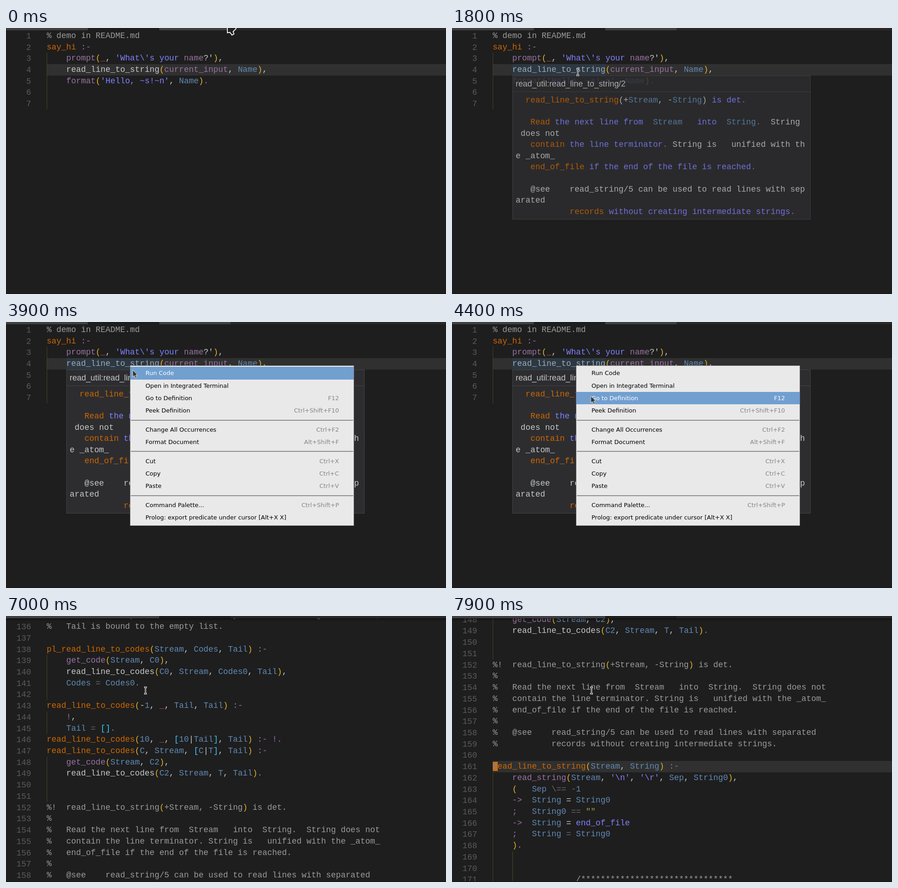
An HTML page for the animation above (8 s loop, 962x582 px).

```html
<!DOCTYPE html>
<html lang="en">
<head>
<meta charset="utf-8">
<title>Jump to definition</title>
<style>
html, body { margin: 0; width: 100%; height: 100%; overflow: hidden; background: #1e1e1e; }
#stage {
  position: relative; width: 962px; height: 582px; overflow: hidden;
  background: #1e1e1e; color: #c5c8c6;
  font: 17.87px/24.72px "Liberation Mono", "Courier New", monospace;
}
#stage div, svg { position: absolute; }
#stage i { font-style: normal; }
#stage .row { position: relative; height: 24.72px; white-space: pre; padding-left: 88.9px; }
.num { left: 0; top: 1px; width: 55px; text-align: right; color: #5a5a5a; }
.guide { width: 1px; background: #45452c; }
.line { left: 89px; right: 0; top: 0; height: 24.72px; background: #303030; }
.row span { position: relative; }
.o { color: #ce6700; }
.p { color: #9872a2; }
.s { color: #8080ff; }
.b { color: #6089b4; }
.r { color: #c7444a; }
.d { color: #676867; }
.g { color: #9aa83a; }
.n { color: #9a9b99; }
.y { color: #e6b422; }
.c { color: #33ccff; }
.k { color: #6089b4; background: #c07020; }

#stage div, #mouse, #mouse svg {
  animation-duration: 8s; animation-timing-function: step-end; animation-iteration-count: infinite;
}
#old, #new { left: 0; top: 0; width: 962px; height: 582px; overflow: hidden; }
#old { animation-name: old; }
#new { animation-name: new; }
#demo { left: 0; top: 4.8px; width: 962px; }
#lib { left: 0; top: -13.6px; width: 962px; animation-name: scroll; }
#shade { left: 0; top: 5px; width: 962px; height: 6px; box-shadow: #000 0 6px 6px -6px inset; }
.tabs { left: 0; top: 0; width: 962px; height: 5px; }
#old .tabs { background: linear-gradient(90deg, #404040 179px, #1e1e1e 0 335px, #404040 0 491px, #282828 0); }
#new .tabs { background: linear-gradient(90deg, #404040 335px, #1e1e1e 0 491px, #282828 0); }
#foot { left: 0; top: 580px; width: 962px; height: 2px; background: #1a1a1a; }

#word { left: 132px; top: 79px; width: 204px; height: 25px; background: rgba(38,79,120,.25); animation-name: word; }
#tip {
  left: 132px; top: 104px; width: 650px; height: 313px;
  background: #2d2d30; border: 1px solid #454545; animation-name: tip;
}
#head {
  left: 0; top: 0; width: 650px; height: 34px; border-bottom: 1px solid #434345;
  font: 17.87px/34px "Liberation Sans", Arial, sans-serif; text-indent: 6.2px;
}
#text { left: 6.3px; top: 40.6px; white-space: pre; line-height: 24.4px; }

#menu {
  left: 271px; top: 95px; width: 488px; height: 349px;
  background: #e9e9e9; border: 1px solid #7d7d7d; color: #000;
  font: 12.97px/27.35px "DejaVu Sans", sans-serif; animation-name: menu;
}
#menu div { position: relative; height: 27.35px; padding-left: 33px; }
#menu div:first-child { margin-top: 2.3px; }
#menu b { position: absolute; right: 32px; font-weight: normal; color: #858585; }
#menu hr { border: 0; height: 2px; margin: 6px 1px 6.1px; background: #8c8c8c; }
#menu div:nth-child(1) { animation-name: pick1; }
#menu div:nth-child(2) { animation-name: pick2; }
#menu div:nth-child(3), #menu div:nth-child(3) b { animation: pick3 8s step-end infinite; }

#mouse { left: 0; top: 0; width: 1px; height: 1px; animation-name: move; }
#mouse svg { left: 0; top: 0; overflow: visible; }
#big { animation-name: big; }
#beam { animation-name: beam; }
#arrow { animation-name: arrow; }

@keyframes old { 0% { visibility: visible; } 83.75% { visibility: hidden; } }
@keyframes new { 0% { visibility: hidden; } 83.75% { visibility: visible; } }
@keyframes word { 0% { opacity: 0; } 22.5% { opacity: 1; } }
@keyframes tip { 0% { opacity: 0; } 22.5% { opacity: .83; } 23.75% { opacity: 1; } }
@keyframes menu { 0% { opacity: 0; } 35% { opacity: 1; } 82.5% { opacity: 0; } }
@keyframes pick1 { 47.5% { background: #719fd0; color: #fff; } 51.25% { background: #e9e9e9; color: #000; } }
@keyframes pick2 { 51.25% { background: #719fd0; color: #fff; } 53.75% { background: #e9e9e9; color: #000; } }
@keyframes pick3 { 53.75%, 100% { background: #719fd0; color: #fff; } }
@keyframes scroll {
  0% { transform: none; }
  96.25% { transform: translateY(-140px); }
  97.5% { transform: translateY(-281px); }
  98.75%, 100% { transform: translateY(-312px); }
}
@keyframes big { 0% { opacity: 1; } 3.75% { opacity: 0; } }
@keyframes beam {
  0% { opacity: 0; } 3.75% { opacity: 1; } 35% { opacity: 0; }
  82.5% { opacity: 1; } 85% { opacity: 0; } 87.5%, 100% { opacity: 1; }
}
@keyframes arrow {
  0% { opacity: 0; } 35% { opacity: 1; } 82.5% { opacity: 0; }
  85% { opacity: 1; } 87.5%, 100% { opacity: 0; }
}
@keyframes move {
  0% { transform: translate(493px, 0); }
  3.75% { transform: translate(468px, 13px); }
  5% { transform: translate(412px, 44px); }
  6.25% { transform: translate(352px, 78px); }
  7.5% { transform: translate(312px, 97px); }
  8.75% { transform: translate(292px, 105px); }
  10% { transform: translate(286px, 108px); }
  12.5% { transform: translate(283px, 105px); }
  13.75% { transform: translate(280px, 102px); }
  15% { transform: translate(279px, 100.5px); }
  17.5% { transform: translate(277px, 98.5px); }
  18.75% { transform: translate(275px, 96.5px); }
  31.25% { transform: translate(275px, 94.5px); }
  35% { transform: translate(273.5px, 94.5px); }
  47.5% { transform: translate(274.5px, 98px); }
  48.75% { transform: translate(277px, 105px); }
  50% { transform: translate(282px, 116px); }
  51.25% { transform: translate(288px, 129px); }
  52.5% { transform: translate(295px, 144px); }
  53.75% { transform: translate(301px, 156px); }
  55% { transform: translate(303.5px, 162px); }
  82.5% { transform: translate(305px, 163px); }
  85% { transform: translate(303.5px, 162px); }
  87.5%, 100% { transform: translate(305px, 163px); }
}
</style>
</head>
<body>
<div id="stage">
  <div id="old">
    <div id="demo"></div>
    <div class="tabs"></div>
    <div id="word"></div>
    <div id="tip"><div id="head">read_util:read_line_to_string/2</div><div id="text"></div></div>
  </div>
  <div id="new">
    <div id="lib"></div>
    <div id="shade"></div>
    <div class="tabs"></div>
  </div>
  <div id="foot"></div>
  <div id="menu"><div>Run Code</div><div>Open in Integrated Terminal</div><div>Go to Definition<b>F12</b></div><div>Peek Definition<b>Ctrl+Shift+F10</b></div><hr><div>Change All Occurrences<b>Ctrl+F2</b></div><div>Format Document<b>Alt+Shift+F</b></div><hr><div>Cut<b>Ctrl+X</b></div><div>Copy<b>Ctrl+C</b></div><div>Paste<b>Ctrl+V</b></div><hr><div>Command Palette...<b>Ctrl+Shift+P</b></div><div>Prolog: export predicate under cursor [Alt+X X]</div></div>
  <div id="mouse">
    <svg id="big" width="1" height="1"><path d="M-9-9V10.5L-3.5 9.5 1 15.5 5.5 13 3.5 8 10 1.5V-9z" fill="#222" stroke="#fff" stroke-width="1.8"/></svg>
    <svg id="beam" width="1" height="1" fill="none">
      <path d="M-3-7H3M-3 7H3M0-7V7" stroke="#fff" stroke-width="2.8"/>
      <path d="M-2.2-7H2.2M-2.2 7H2.2M0-7V7" stroke="#111" stroke-width="1"/>
    </svg>
    <svg id="arrow" width="1" height="1"><path d="M0 0V15L3.6 12 6.2 17.6 8.8 16.4 6.4 11.2 10.4 10.6z" fill="#333" stroke="#e4e4e4"/></svg>
  </div>
</div>
<script>
const ROW = 24.72;
const el = id => document.getElementById(id);

// {xtext} gives text the colour class x
const tint = s => s.replace(/\{(\w)([^}]*)\}/g, '<i class=$1>$2</i>');

function code(s) {
  const note = /^\s*[%/]/.test(s);
  if (!note) s = s.replace(/(?<!')\b[A-Z]\w*/g, '<i class=b>$&</i>');
  s = s.replace(/[()]/g, '<i class=y>$&</i>').replace(/[[\]]/g, '<i class=c>$&</i>');
  return `<span${note ? ' class=n' : ''}>${tint(s)}</span>`;
}

// guides: [first row, last row, x]
function listing(id, first, current, guides, text) {
  const rows = text.split('\n').map((s, i) => {
    const n = first + i;
    return `<div class=row>${n === current ? '<div class=line></div>' : ''}<div class=num>${n}</div>${code(s)}</div>`;
  });
  const bars = guides.map(([a, b, x]) =>
    `<div class=guide style="left:${x}px;top:${(a - first) * ROW}px;height:${(b - a + 1) * ROW}px"></div>`);
  el(id).innerHTML = rows.join('') + bars.join('');
}

listing('demo', 1, 4, [[3, 7, 89]], String.raw`% demo in README.md
{osay_hi} {p:-}
    {pprompt}({r_}, {s'What\'s your} {pname}?'),
    read_line_to_string({pcurrent_input}, Name),
    {pformat}({s'Hello, ~s!~n'}, Name){p.}

`);

listing('lib', 135, 161,
  [[139, 142, 89], [144, 145, 89], [148, 151, 89], [162, 171, 89], [169, 171, 132]],
  String.raw`%   This reads a part of the local body until the string is removed,
%   Tail is bound to the empty list.

{opl_read_line_to_codes}(Stream, Codes, Tail) {p:-}
    {pget_code}(Stream, C0),
    read_line_to_codes(C0, Stream, Codes0, Tail),
    Codes {d=} Codes0{p.}

{oread_line_to_codes}(-{b1}, {r_}, Tail, Tail) {p:-}
    {p!},
    Tail {d=} []{p.}
{oread_line_to_codes}({b10}, {r_}, [{b10}|Tail], Tail) {p:-} {p!.}
{oread_line_to_codes}(C, Stream, [C|T], Tail) {p:-}
    {pget_code}(Stream, C2),
    read_line_to_codes(C2, Stream, T, Tail){p.}


%!  read_line_to_string(+Stream, -String) is det.
%
%   Read the next line from  Stream   into  String.  String does not
%   contain the line terminator. String is   unified with the _atom_
%   end_of_file if the end of the file is reached.
%
%   @see    read_string/5 can be used to read lines with separated
%           records without creating intermediate strings.

{kr}{oead_line_to_string}(Stream, String) {p:-}
    {pread_string}(Stream, {s'\n'}, {s'\r'}, Sep, String0),
    (   Sep {d\==} {d-}{b1}
    {p->}  String = String0
    {p;}   String0 {d==} {g""}
    {p->}  String = {send_of_file}
    {p;}   String {d=} String0
    ){p.}


` + ' '.repeat(17) + '/' + '*'.repeat(31));

el('text').innerHTML = tint(`  {oread_line_to_string}(+{bStream}, -{bString}) {sis det}{p.}

   {oRead} {sthe next line from}  {bStream}   {sinto}  {bString}{p.}  String
 does not
   {ocontain} {sthe line terminator}{p.} String is   unified with th
e _atom_
   {oend_of_file} {sif the end of the file is reached}{p.}

   @see    read_string/5 can be used to read lines with sep
arated
           {orecords} {swithout creating intermediate strings}{p.}`);
</script>
</body>
</html>
```
